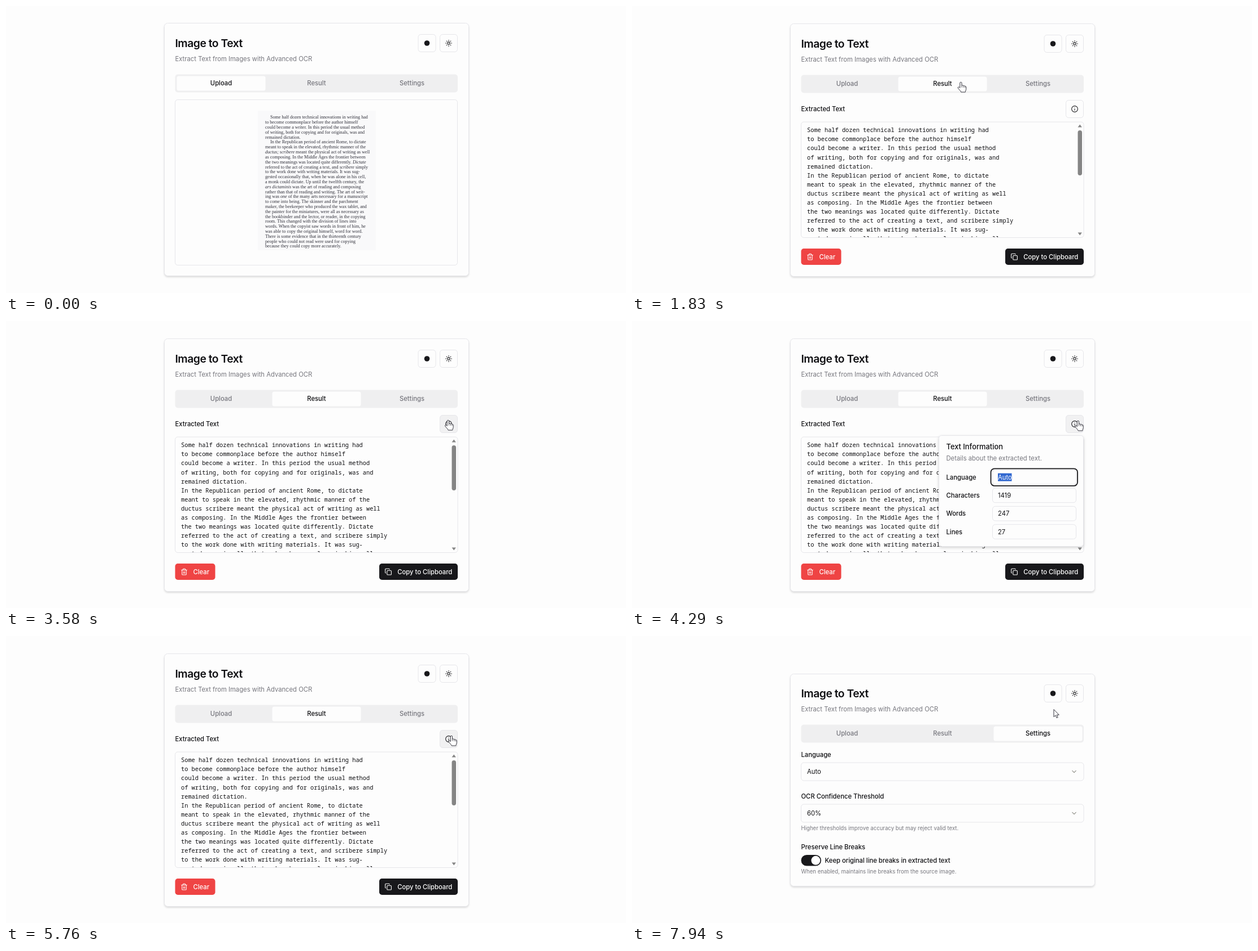
An HTML page that plays this animation: 1098x510 px, repeating every 8000 ms.

```html
<!DOCTYPE html>
<html lang="en">
<head>
<meta charset="utf-8">
<title>Image to Text</title>
<style>
  html, body { margin: 0; width: 100%; height: 100%; overflow: hidden; background: #fdfdfd; }
  svg { display: block; width: 1098px; height: 510px; font-family: Inter, sans-serif; }
  text { white-space: pre; }
  .page { font-family: "Liberation Serif", serif; }
  .mono { font-family: "Noto Sans Mono", monospace; }
  .shadow { filter: drop-shadow(0 2px 1.6px rgba(0, 0, 0, .13)); }
  .lift { filter: drop-shadow(0 2px 2.5px rgba(0, 0, 0, .16)); }
</style>
</head>
<body>
<svg id="stage" viewBox="0 0 1098 510"></svg>
<script>
const LOOP = 8000;
const INK = '#0f0f12', DARK = '#18181b', MUTED = '#76767d', LINE = '#e6e6ea', PAPER = '#fdfdfd';
const TABS = ['Upload', 'Result', 'Settings'];
const TAB_W = 157, tabX = i => 302.5 + i * 169;

// View switches and popover times
const RESULT_AT = 1560, SETTINGS_AT = 6720, OPEN_AT = 4075, CLOSE_AT = 5490, FADE = 150;

// Layout of the card per view: header offset, top, height
const VIEWS = [
  { dy: 0, top: 30, h: 450 },
  { dy: 1, top: 31, h: 450 },
  { dy: 36, top: 67, h: 378 }
];

// Pointer path: time, x, y
const PATH = [
  [630, 591, 24], [1050, 581.5, 114], [1400, 582.5, 135.5], [2530, 582.5, 135.5],
  [2810, 683, 156], [3020, 692, 163], [3230, 692, 163], [3650, 790, 177.5],
  [5200, 790, 177.5], [5270, 789, 177.5], [6110, 789, 177.5], [6540, 746, 138],
  [7800, 746, 138], [7940, 747, 130.5]
];

const PROSE = `Some half dozen technical innovations in writing had
to become commonplace before the author himself
could become a writer. In this period the usual method
of writing, both for copying and for originals, was and
remained dictation.
In the Republican period of ancient Rome, to dictate
meant to speak in the elevated, rhythmic manner of the
_ductus; scribere_ meant the physical act of writing as well
as composing. In the Middle Ages the frontier between
the two meanings was located quite differently. _Dictate_
referred to the act of creating a text, and _scribere_ simply
to the work done with writing materials. It was sug-
gested occasionally that, when he was alone in his cell,
a monk could dictate. Up until the twelfth century, the
_ars dictaminis_ was the art of reading and composing
rather than that of reading and writing. The art of writ-
ing was _one_ of the many arts necessary for a manuscript
to come into being. The skinner and the parchment
maker, the beekeeper who produced the wax tablet, and
the painter for the miniatures, were all as necessary as
the bookbinder and the lector, or reader, in the copying
room. This changed with the division of lines into
words. When the copyist saw words in front of him, he
was able to copy the original himself, word for word.
There is some evidence that in the thirteenth century
people who could not read were used for copying
because they could copy more accurately.`.split('\n');

// Text whose capitals are centred on y
function label(s, x, y, { size = 11.25, fill = INK, weight = 400, more = '' } = {}) {
  return `<text x="${x}" y="${y + size * .364}" font-size="${size}" fill="${fill}" font-weight="${weight}" ${more}>${s}</text>`;
}
const bold = (s, x, y, o) => label(s, x, y, { weight: 500, ...o });
const box = (x, y, w, h, fill, more = '', r = 4.8) =>
  `<rect x="${x}" y="${y}" width="${w}" height="${h}" rx="${r}" fill="${fill}" ${more}/>`;
const frame = (x, y, w, h, more = '') => box(x, y, w, h, PAPER, `stroke="${LINE}" ${more}`);
const icon = (cx, cy, d, color, size = 12.9) =>
  `<path d="${d}" transform="translate(${cx - size / 2} ${cy - size / 2}) scale(${size / 24})"
    fill="none" stroke="${color}" stroke-width="2" stroke-linecap="round" stroke-linejoin="round"/>`;

const ring = r => `M${12 - r} 12a${r} ${r} 0 1 0 ${2 * r} 0a${r} ${r} 0 1 0 ${-2 * r} 0`;
const rays = Array.from({ length: 8 }, (_, i) => {
  const a = i * Math.PI / 4, c = Math.cos(a), s = Math.sin(a);
  return `M${12 + 8 * c} ${12 + 8 * s}L${12 + 10 * c} ${12 + 10 * s}`;
}).join('');
const ICONS = {
  sun: ring(4) + rays,
  info: ring(10) + 'M12 16v-4M12 8h.01',
  trash: 'M3 6h18M19 6v14a2 2 0 0 1-2 2H7a2 2 0 0 1-2-2V6M8 6V4a2 2 0 0 1 2-2h4a2 2 0 0 1 2 2v2M10 11v6M14 11v6',
  copy: 'M10 8h10a2 2 0 0 1 2 2v10a2 2 0 0 1-2 2H10a2 2 0 0 1-2-2V10a2 2 0 0 1 2-2zM4 16a2 2 0 0 1-2-2V4a2 2 0 0 1 2-2h10a2 2 0 0 1 2 2',
  down: 'M6 9l6 6 6-6'
};

function header() {
  return label('Image to Text', 299.5, 66, { size: 19.3, weight: 600, more: 'letter-spacing="-.025em"' })
    + label('Extract Text from Images with Advanced OCR', 299.5, 93.6, { fill: MUTED })
    + frame(730, 50.5, 31, 31) + `<circle cx="745.5" cy="66" r="4.8" fill="${DARK}"/>`
    + frame(768.5, 50.5, 31, 31) + icon(784, 66, ICONS.sun, DARK)
    + box(299.5, 121.5, 500.5, 32, '#efeff0')
    + box(0, 124.5, TAB_W, 26, PAPER, 'id="active"', 3.5)
    + TABS.map((s, i) => bold(s, tabX(i) + TAB_W / 2, 137, { more: 'text-anchor="middle" class="tab"' })).join('');
}

function uploadView() {
  const lines = PROSE.map((s, i) => {
    const indent = i === 0 || i === 5 ? 9 : 0;
    const rich = s.replace(/_(.+?)_/g, '<tspan font-style="italic">$1</tspan>');
    return `<text x="${459 + indent}" y="${200.4 + i * 8.81}" font-size="8.1" fill="#30303a">${rich}</text>`;
  });
  return frame(299.5, 166.5, 500, 294)
    + box(446, 186, 209, 248, '#f9f9fa', '', 0)
    + `<g class="page">${lines.join('')}</g>`;
}

function resultView() {
  const lines = PROSE.slice(0, 13).map((s, i) =>
    label(s.replace(/[_;]/g, ''), 310, 220.5 + i * 16.1, { size: 10.32 }));
  return bold('Extracted Text', 299.5, 183)
    + frame(768.5, 167.5, 31, 31, 'id="infoBox"') + icon(784, 183, ICONS.info, DARK)
    + frame(299.5, 206, 500.5, 205.5)
    + `<g class="mono" clip-path="url(#area)">${lines.join('')}</g>`
    + box(789.5, 221, 7.5, 80, '#858585', '', 3.7)
    + '<path d="M789.5 215.5h7.4l-3.7-5zM789.5 402.5h7.4l-3.7 5z" fill="#858585"/>'
    + box(299.5, 431, 71, 29, '#ef4444') + icon(315.5, 445.7, ICONS.trash, '#fff')
    + bold('Clear', 331.5, 445.7, { fill: '#fff' })
    + box(661, 431, 139, 29, DARK) + icon(677, 445.7, ICONS.copy, '#fff')
    + bold('Copy to Clipboard', 693.3, 445.7, { fill: '#fff' });
}

function popover() {
  const rows = [['Language', 'Auto'], ['Characters', '1419'], ['Words', '247'], ['Lines', '27']];
  return box(543.5, 203.5, 256, 197, PAPER, `stroke="${LINE}" class="lift"`)
    + bold('Text Information', 556.5, 223, { size: 12.86 })
    + label('Details about the extracted text.', 556.5, 243.6, { fill: MUTED })
    + rows.map(([name, value], i) => {
      const y = 277.6 + i * 32.3, first = i === 0;
      return bold(name, 556.5, y) + frame(638.5, y - 12.8, 148, 25.6)
        + (first ? box(635.5, y - 15.3, 153.5, 30.6, 'none', `stroke="${DARK}" stroke-width="1.8"`, 6.5)
          + box(648, y - 7, 24.5, 14, '#3067d0', '', 0) : '')
        + label(value, 648, y, { fill: first ? '#fff' : INK });
    }).join('');
}

function settingsView() {
  const select = (y, s) => frame(299.5, y - 16, 500.5, 32) + label(s, 310, y)
    + icon(783, y, ICONS.down, '#8c8c84');
  const hint = (s, y) => label(s, 299.5, y, { size: 9.64, fill: MUTED });
  return bold('Language', 299.5, 210.6) + select(241, 'Auto')
    + bold('OCR Confidence Threshold', 299.5, 284.6) + select(315, '60%')
    + hint('Higher thresholds improve accuracy but may reject valid text.', 341)
    + bold('Preserve Line Breaks', 299.5, 375)
    + box(299.5, 389, 35.5, 19.6, DARK, '', 9.8)
    + '<circle cx="325.4" cy="398.8" r="8" fill="#fff"/>'
    + bold('Keep original line breaks in extracted text', 341.5, 399)
    + hint('When enabled, maintains line breaks from the source image.', 418.6);
}

const stage = document.getElementById('stage');
stage.innerHTML = `
  <clipPath id="area"><rect x="300" y="206" width="489" height="205"/></clipPath>
  <rect width="1098" height="510" fill="${PAPER}"/>
  <rect id="card" class="shadow" x="280.5" width="539" rx="6" fill="${PAPER}" stroke="${LINE}"/>
  <g id="head">${header()}</g>
  <g class="view">${uploadView()}</g>
  <g class="view">${resultView()}</g>
  <g class="view">${settingsView()}</g>
  <g id="pop">${popover()}</g>
  <g id="pointer" fill="#fff" stroke="#33333c" stroke-width="1" stroke-linejoin="round">
    <path id="arrow" d="M0 0V13.2L3 10.5 5 15 7.2 14 5.2 9.7H9.3Z"/>
    <g id="hand">
      <path d="M-1.7 10V1.4a1.6 1.6 0 0 1 3.2 0V6c.4-1 2.9-.8 3 .5.6-.9 2.6-.6 2.7.7.7-.6 2 0 2 1.3V12c0 2-1.2 3-1.4 5.5H.2C-.3 15.5-3 13.4-5 10.6c-1.2-1.8.8-3 2-1.8z"/>
      <path d="M1.5 6v3.2M4.5 6.5v3M7.2 7.2v2.6" fill="none" stroke-width=".8"/>
    </g>
  </g>`;

const el = id => document.getElementById(id);
const views = [...document.querySelectorAll('.view')], tabs = [...document.querySelectorAll('.tab')];
const show = (node, on) => node.setAttribute('display', on ? 'inline' : 'none');
const clamp = v => Math.max(0, Math.min(1, v));

function pointerAt(t) {
  const i = PATH.findIndex(p => p[0] > t);
  if (i < 0) return PATH[PATH.length - 1].slice(1);
  if (i === 0) return PATH[0].slice(1);
  const [t0, x0, y0] = PATH[i - 1], [t1, x1, y1] = PATH[i];
  const k = (t - t0) / (t1 - t0), e = k * k * (3 - 2 * k);
  return [x0 + (x1 - x0) * e, y0 + (y1 - y0) * e];
}

function draw(t) {
  const view = t < RESULT_AT ? 0 : t < SETTINGS_AT ? 1 : 2;
  const { dy, top, h } = VIEWS[view];
  el('card').setAttribute('y', top + .5);
  el('card').setAttribute('height', h - 1);
  el('head').setAttribute('transform', `translate(0 ${dy})`);
  el('active').setAttribute('x', tabX(view));
  tabs.forEach((n, i) => n.setAttribute('fill', i === view ? INK : MUTED));
  views.forEach((n, i) => show(n, i === view));

  const [x, y] = pointerAt(t);
  const onInfo = view === 1 && x > 768 && x < 800 && y > 167 && y < 199;
  const onTab = y > 124 + dy && y < 151 + dy && TABS.some((_, i) => x > tabX(i) && x < tabX(i) + TAB_W);
  show(el('pointer'), t >= PATH[0][0]);
  show(el('hand'), onInfo || onTab);
  show(el('arrow'), !onInfo && !onTab);
  el('pointer').setAttribute('transform', `translate(${x} ${y})`);
  el('infoBox').setAttribute('fill', onInfo ? '#f1f1f2' : PAPER);

  const p = clamp((t - OPEN_AT) / FADE) * (1 - clamp((t - CLOSE_AT) / FADE));
  const s = .95 + .05 * p;
  show(el('pop'), p > 0);
  el('pop').setAttribute('opacity', p);
  el('pop').setAttribute('transform', `translate(${800 * (1 - s)} ${203 * (1 - s) - 6.4 * (1 - p)}) scale(${s})`);
}

const start = performance.now();
function tick() {
  draw((performance.now() - start) % LOOP);
  requestAnimationFrame(tick);
}
tick();
</script>
</body>
</html>
```
